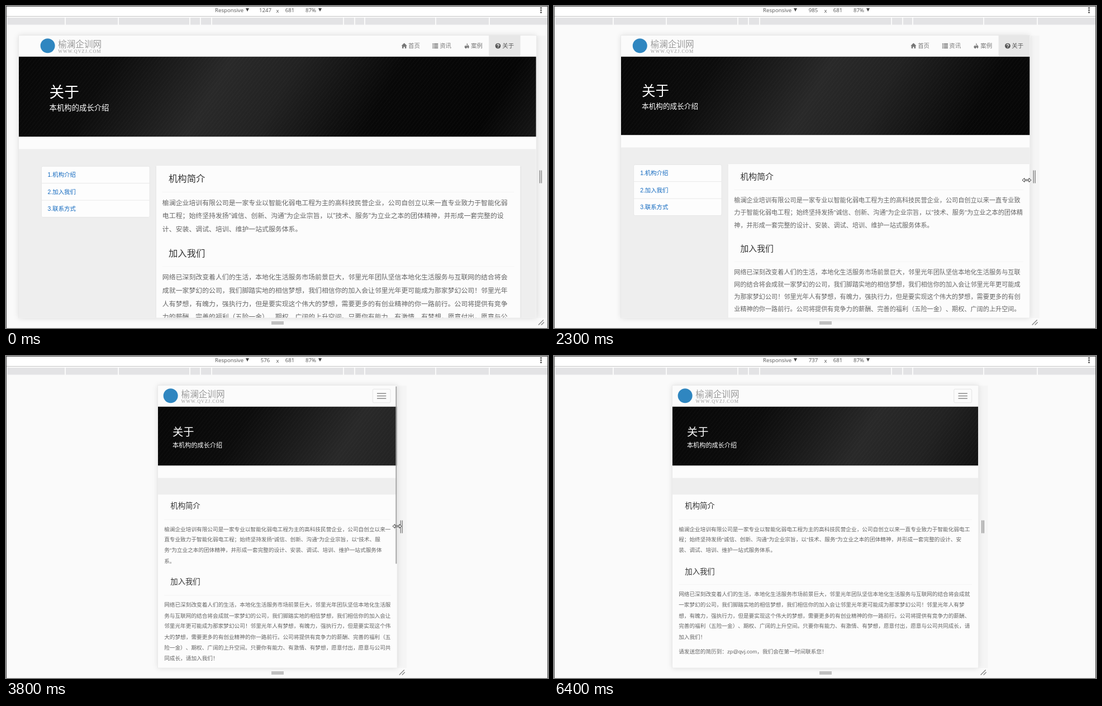
Animation of 970 by 577 pixels, one loop 7.4 s. Source, as an HTML page:

```html
<!DOCTYPE html>
<html lang="zh-CN">
<head>
<meta charset="utf-8">
<style>
html, body { margin: 0; width: 100%; height: 100%; overflow: hidden; }
body { position: relative; background: #fafafa; text-spacing-trim: space-all;
  font-family: "Liberation Sans", "Noto Sans CJK SC", "Noto Sans CJK", sans-serif; }
h1, h2, p { margin: 0; font-weight: 400; }
body > *, #page .abs { position: absolute; }

/* Tool shell */
#bar { left: 0; top: 0; width: 970px; height: 18px; background: #fff; border-bottom: 1px solid #c4c4c4;
  font: 9.7px/15px "Open Sans", sans-serif; color: #555; }
#bar span { position: absolute; top: 0; white-space: nowrap; }
#bar .mid { transform: translateX(-50%); }
#bar i { position: absolute; left: 956px; width: 2.5px; height: 2.5px; border-radius: 50%; background: #666; }
.tri::after { content: ""; display: inline-block; margin-left: 4px; vertical-align: 1px;
  border: 3.5px solid transparent; border-top: 6px solid #444; border-bottom: 0; }
#edge { inset: 0; border: 1px solid #444; border-bottom: 0; pointer-events: none; }
#ui { left: 0; top: 0; }

/* Emulated page, laid out in its own pixels */
#page { top: 53px; height: 681px; overflow: hidden; transform: scale(.7424); transform-origin: 0 0;
  background: #fcfcfc; box-shadow: 0 0 0 1px #e9e9e9, 0 0 14px rgba(0,0,0,.13); }
#view { position: relative; height: 1400px; }
.box { position: relative; margin: 0 auto; }
nav { height: 50px; border-bottom: 1px solid #e7e7e7; background: #fbfbfb; }
#logo { left: 13px; top: 7px; width: 35px; height: 35px; border-radius: 50%; background: #2f86c0; }
#name { left: 56px; top: 21px; font-size: 21px; line-height: 0; color: #999; white-space: nowrap; }
#site { left: 56px; top: 38px; font: 11px/0 "Liberation Serif", serif; letter-spacing: 1.4px; color: #999; }
#menu { right: 0; top: 0; display: flex; font-size: 14px; line-height: 49px; color: #777; }
#menu span { display: flex; align-items: center; gap: 3.5px; height: 50px; padding: 0 15px; white-space: nowrap; }
#menu span:last-child { background: #e7e7e7; color: #555; }
#burger { right: 15px; top: 8px; width: 42px; height: 32px; border: 1px solid #ddd; border-radius: 4px; }
#burger::after { content: ""; position: absolute; left: 10px; top: 9px; width: 22px; height: 2px;
  background: #888; box-shadow: 0 6px #888, 0 12px #888; }
#banner { height: var(--banner); color: #fff; background:
  repeating-linear-gradient(128deg, rgba(255,255,255,.018) 0 2px, transparent 2px 7px),
  linear-gradient(120deg, #070707, #0c0c0c 17%, #292929 38%, #222 50%, #080808 69%, #050505 89%, #171717) 0 0 / 1247px 100%; }
#banner .abs { left: 35px; line-height: 0; white-space: nowrap; }
#banner h1 { top: var(--ty); font-size: var(--title); }
#banner p { top: var(--sy); font-size: var(--sub); }
#main { margin-top: 30px; padding-top: 40px; height: 1200px; background: #eee; }
#side { left: 15px; top: 1px; width: calc(25% - 32px); border: 1px solid #e2e2e2; border-radius: 4px;
  background: #fdfdfd; font-size: 14px; line-height: 40px; color: #1068bf; }
#side div { padding-left: 15px; }
#side div + div { border-top: 1px solid #e2e2e2; }
#card { box-sizing: border-box; margin-left: auto; height: 1160px; padding: 0 15px; background: #fcfcfc;
  color: #666; font-size: var(--fs); line-height: var(--lh); box-shadow: 1px 1px 3px rgba(0,0,0,.25); }
#card h2 { height: calc(var(--c) + 31.3px); margin-bottom: 10px; padding-left: 15px; color: #333;
  border-bottom: 1px solid #f1f1f1; font-size: var(--head); line-height: calc(2 * var(--c)); white-space: nowrap; }
#card p { margin-bottom: 10px; }
#thumb { top: 2px; width: 2.6px; background: #a4a4a4; }

.t0 { --fs: 16px; --lh: 31.9px; --head: 22px; --c: 31.7px; --title: 36px; --sub: 18px; --ty: 87px; --sy: 123px; --banner: 193px; }
.t1 { --fs: 15px; --lh: 29.8px; --head: 20px; --c: 31px; --title: 33px; --sub: 17px; --ty: 84px; --sy: 120.5px; --banner: 189px; }
.t2 { --fs: 14px; --lh: 27.9px; --head: 19px; --c: 29px; --title: 30px; --sub: 16px; --ty: 82px; --sy: 118.5px; --banner: 184.5px; }
.t3 { --fs: 13px; --lh: 25.7px; --head: 18px; --c: 28.3px; --title: 26px; --sub: 15px; --ty: 61px; --sy: 93.5px; --banner: 142px; }
.t2 #side, .t3 #side, .t3 #menu { display: none; }
.t0 #burger, .t1 #burger, .t2 #burger { display: none; }
.t0 #card, .t1 #card { width: 75%; }
.t3 #card { box-shadow: none; }
</style>
</head>
<body>
<div id="bar">
  <span class="tri" style="left:374px">Responsive</span>
  <span class="mid" id="num" style="left:464px"></span>
  <span class="mid" style="left:486px;top:1px">x</span>
  <span class="mid" style="left:508px">681</span>
  <span class="tri" style="left:536px">87%</span>
  <i style="top:2px"></i><i style="top:6px"></i><i style="top:10px"></i>
</div>

<svg id="ui" width="970" height="577" fill="none" stroke="#8a8a8a">
  <g id="ruler" stroke="none"></g>
  <path d="M475 566.5h22M475 569.5h22" stroke-width="1.5"/>
  <g id="grip">
    <rect id="strip" x="1" y="53" width="16" height="506" fill="#000" stroke="none"/>
    <path d="M6.5 294.5v23M9.5 294.5v23" stroke-width="1.5"/>
    <path d="M4 571.5l9-9M9 571.5l5-5" stroke-width="1.5"/>
  </g>
</svg>

<div id="page"><div id="view">
  <nav><div class="box">
    <div class="abs" id="logo"></div>
    <div class="abs" id="name">榆澜企训网</div>
    <div class="abs" id="site">WWW.QVZJ.COM</div>
    <div class="abs" id="menu">
      <span><svg width="14" height="14" fill="currentColor"><path d="M7 0l7 7h-2v6H8.500V9h-3v4H2V7H0z"/></svg>首页</span>
      <span><svg width="14" height="14" stroke="currentColor" stroke-width="2"><path d="M0 2h3m1 0h10M0 5.300h3m1 0h10M0 8.600h3m1 0h10M0 12h3m1 0h10"/></svg>资讯</span>
      <span><svg width="14" height="14" fill="currentColor"><path d="M7 0c4 4-1 6 1 8 2-1 1-3 1-4 5 4 4 8 0 10 1-2 0-3-1-4-1 2-3 2-2 4-5-2-6-5-2-9 0 2 0 3 1 3 2-2 2-5 2-8z"/></svg>案例</span>
      <span><svg width="14" height="14"><circle cx="7" cy="7" r="6.600" fill="currentColor"/><path d="M4.700 5.500c0-3 4.800-3 4.800 0 0 1.500-2.400 1.500-2.400 3.200M7.100 9.800v2" fill="none" stroke="#e7e7e7" stroke-width="1.800"/></svg>关于</span>
    </div>
    <div class="abs" id="burger"></div>
  </div></nav>
  <div id="banner"><div class="box">
    <h1 class="abs">关于</h1>
    <p class="abs">本机构的成长介绍</p>
  </div></div>
  <div id="main"><div class="box">
    <div class="abs" id="side"><div>1.机构介绍</div><div>2.加入我们</div><div>3.联系方式</div></div>
    <div id="card">
      <h2>机构简介</h2>
      <p>榆澜企业培训有限公司是一家专业以智能化弱电工程为主的高科技民营企业，公司自创立以来一直专业致力于智能化弱电工程；始终坚持发扬"诚信、创新、沟通"为企业宗旨，以"技术、服务"为立业之本的团体精神，并形成一套完整的设计、安装、调试、培训、维护一站式服务体系。</p>
      <h2>加入我们</h2>
      <p>网络已深刻改变着人们的生活，本地化生活服务市场前景巨大，邻里光年团队坚信本地化生活服务与互联网的结合将会成就一家梦幻的公司，我们脚踏实地的相信梦想，我们相信你的加入会让邻里光年更可能成为那家梦幻公司！邻里光年人有梦想，有魄力，强执行力，但是要实现这个伟大的梦想，需要更多的有创业精神的你一路前行。公司将提供有竞争力的薪酬、完善的福利（五险一金）、期权、广阔的上升空间。只要你有能力、有激情、有梦想，愿意付出，愿意与公司共同成长，请加入我们！</p>
      <p>请发送您的简历到：zp@qvj.com，我们会在第一时间联系您！</p>
    </div>
  </div></div>
  <div class="abs" id="thumb"></div>
</div></div>

<svg id="ui2" width="970" height="577" style="left:0;top:0">
  <g id="cursor" fill="#fff" stroke="#222" stroke-width=".9">
    <path id="resize" d="M-8 0l4-3.500v2.500h8v-2.500l4 3.500-4 3.500v-2.500h-8v2.500z"/>
    <path id="arrow" d="M0 0v12l2.800-2.600 1.800 4 1.800-.8-1.800-4h3.800z"/>
  </g>
</svg>
<div id="edge"></div>

<script>
const $ = id => document.getElementById(id);
const SCALE = .7424, CENTER = 486, LOOP = 7400;

// time, frame width, layout width (trails while dragging), cursor x, cursor y, scroll thumb length
const KEYS = [
  [0, 1247, 1247, 938, 345, 418],
  [200, 1247, 1247, 938, 345, 418],
  [900, 1247, 1247, 951, 317, 418],
  [1500, 1247, 1247, 948, 315, 418],
  [2200, 1027, 1042, 862, 312, 418],
  [2300, 985, 1000, 846, 312, 418],
  [3000, 815, 817, 788, 310, 418],
  [3800, 576, 576, 700, 305, 428],
  [4500, 500, 500, 672, 305, 440],
  [4600, 500, 500, 672, 305, 440],
  [5100, 649, 633, 735, 306, 450],
  [5400, 737, 737, 768, 306, 450],
  [5500, 737, 737, 768, 306, 450],
  [6300, 737, 737, 966, 75, 450],
  [LOOP, 737, 737, 966, 75, 450]
];
const ruler = [1, 106, 201, 329, 348, 368, 604, 624, 642, 769, 865, 970];
$('ruler').innerHTML = ruler.slice(1).map((x, i) =>
  `<rect x="${ruler[i] + 1}" y="21" width="${x - ruler[i] - 2}" height="12.5" fill="#e3e3e5"/>`).join('');

const clamp = v => Math.max(0, Math.min(1, v));

function sample(t) {
  const i = KEYS.findIndex(k => k[0] > t), a = KEYS[i - 1], b = KEYS[i];
  const u = (t - a[0]) / (b[0] - a[0]);
  return a.map((v, j) => v + (b[j] - v) * u);
}

function draw(now) {
  const t = Math.floor(now % LOOP / 100) * 100;
  const [, w, layout, cx, cy, thumb] = sample(t);
  const right = CENTER + w * SCALE / 2;
  const tier = [1200, 992, 768, 0].findIndex(min => layout >= min);

  $('num').textContent = Math.round(w);
  $('page').className = 't' + tier;
  $('page').style.width = w + 'px';
  $('page').style.left = CENTER - w * SCALE / 2 + 'px';
  $('view').style.width = layout + 'px';
  for (const box of document.querySelectorAll('.box'))
    box.style.width = [1170, 970, 750, layout][tier] + 'px';

  $('thumb').style.left = layout - 2.6 + 'px';
  $('thumb').style.height = thumb + 'px';
  $('thumb').style.opacity = t < 2500 ? 0 : clamp((5900 - t) / 400);

  $('grip').setAttribute('transform', `translate(${right})`);
  $('strip').setAttribute('opacity', t > 1500 ? .02 : .02 + .08 * clamp((t - 200) / 500));

  $('cursor').setAttribute('transform', `translate(${cx} ${cy})`);
  $('cursor').style.display = t >= 300 && t < 6400 ? '' : 'none';
  $('resize').style.display = t < 5700 ? '' : 'none';
  $('arrow').style.display = t < 5700 ? 'none' : '';
}

let start;
function tick(now) {
  start ??= now;
  draw(now - start);
  requestAnimationFrame(tick);
}
draw(0);
requestAnimationFrame(tick);
</script>
</body>
</html>
```
